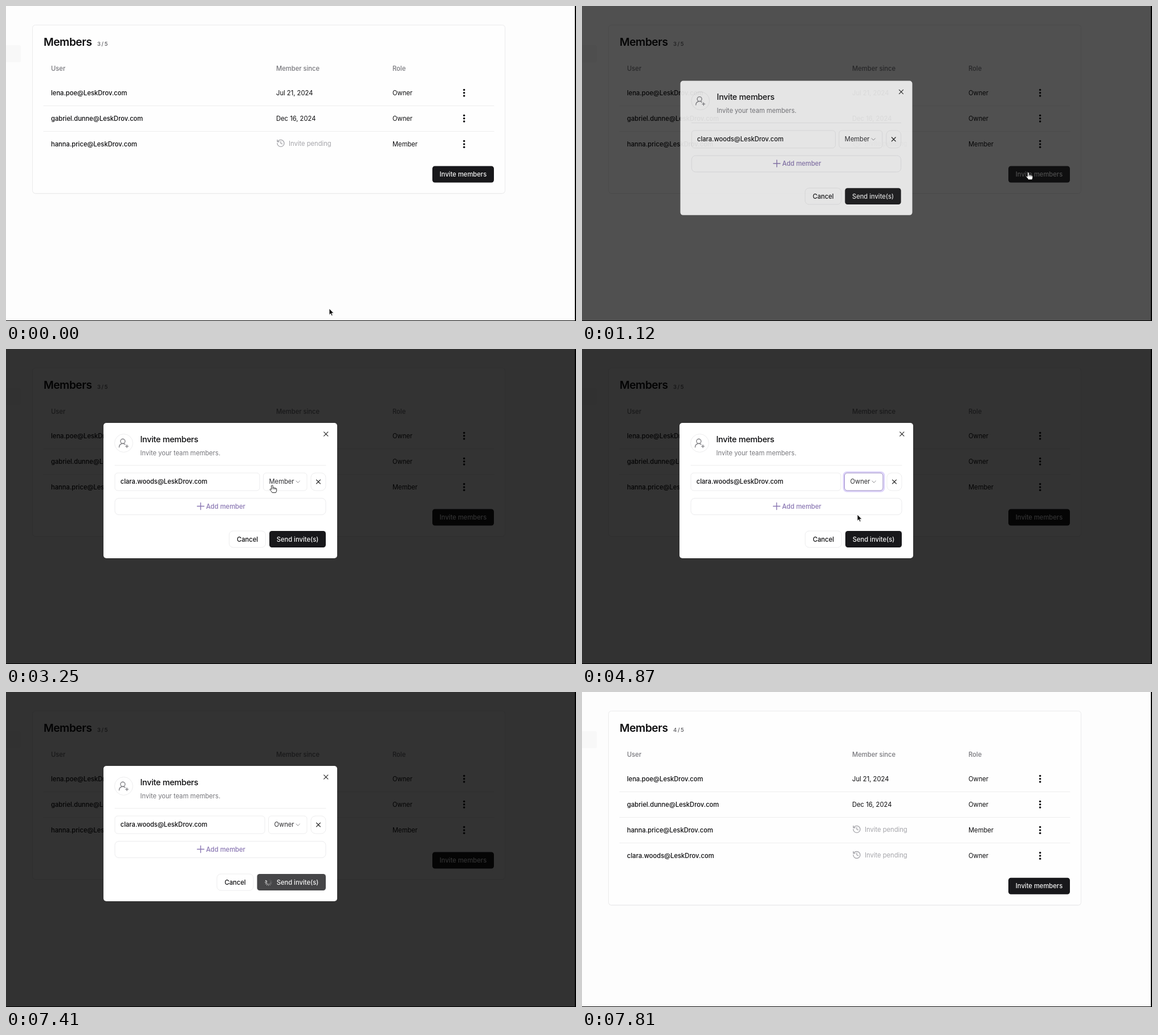
These frames come from a looping animation (1000x554 px, 9 s). An HTML page:

```html
<!DOCTYPE html>
<html lang="en">
<head>
<meta charset="utf-8">
<title>Invite members</title>
<style>
html, body { margin: 0; width: 100%; height: 100%; overflow: hidden; background: #fdfdfd; }
svg { display: block; width: 100vw; height: 100vh; font-family: Inter, sans-serif; cursor: none; }
</style>
</head>
<body>
<svg id="stage" viewBox="0 0 1000 554"></svg>
<script>
const LOOP = 9000, OPEN = 1005, PICK = 3590, CHOSEN = 4870, SEND = 6010, CLOSE = 7450, ADDED = 7810;
const INK = '#0c0c0e', GREY = '#77777c', PALE = '#a5a5aa', LINE = '#ededee', DARK = '#18181b', HOVER = '#2f2f32';
const stage = document.getElementById('stage');

const members = [
  ['lena.poe@LeskDrov.com', 'Jul 21, 2024', 'Owner'],
  ['gabriel.dunne@LeskDrov.com', 'Dec 16, 2024', 'Owner'],
  ['hanna.price@LeskDrov.com', '', 'Member'],
  ['clara.woods@LeskDrov.com', '', 'Owner']
];

// Cursor stops: time, x, y; it moves between stops of different place.
const stops = [
  [0, 567, 532], [110, 567, 532], [510, 783, 292], [1320, 783, 292], [2250, 402, 247],
  [2700, 402, 247], [3440, 468, 239], [3750, 468, 239], [4490, 483, 291], [4880, 483, 291], [5360, 512, 333], [LOOP, 512, 333]
];

const clamp = v => Math.min(1, Math.max(0, v));
const ramp = (t, a, b) => clamp((t - a) / (b - a));
const smooth = p => p * p * (3 - 2 * p);
const ease = p => 1 - (1 - p) ** 2.2;
const mix = (a, b, p) => a + (b - a) * p;
const within = (p, x1, y1, x2, y2) => p.x > x1 && p.x < x2 && p.y > y1 && p.y < y2;

const text = (x, y, s, fill = INK, weight = 400, size = 11.2, extra = '') =>
  `<text x="${x}" y="${y}" fill="${fill}" font-weight="${weight}" font-size="${size}" ${extra}>${s}</text>`;
const box = (x, y, x2, y2, r, fill, stroke = 'none', extra = '') =>
  `<rect x="${x}" y="${y}" width="${x2 - x}" height="${y2 - y}" rx="${r}" fill="${fill}" stroke="${stroke}" ${extra}/>`;
const path = (d, stroke, width, extra = '') =>
  `<path d="${d}" fill="none" stroke="${stroke}" stroke-width="${width}" stroke-linecap="round" stroke-linejoin="round" ${extra}/>`;
const icon = (x, y, k, d, stroke, width = 2) => path(d, stroke, width, `transform="translate(${x} ${y}) scale(${k})"`);
const cross = (x, y, r, width) => path(`M${x - r} ${y - r}l${2 * r} ${2 * r}m0 ${-2 * r}l${-2 * r} ${2 * r}`, '#222', width);
const rule = (x, x2, y) => path(`M${x} ${y}H${x2}`, LINE, 1);

function cursorAt(t) {
  const i = stops.findIndex(s => s[0] > t), [t1, x1, y1] = stops[i - 1], [t2, x2, y2] = stops[i];
  const p = 1 - (1 - ramp(t, t1, t2)) ** 3;
  return { x: mix(x1, x2, p), y: mix(y1, y2, p) };
}

function row([mail, since, role], i) {
  const c = 152.7 + i * 45.1;
  return (i ? rule(66, 856, Math.round(c - 23) + .5) : '') +
    text(79, c + 4, mail, INK, 500) +
    (since ? text(474, c + 4, since)
      : icon(474, c - 9.5, .667, 'M3 12a9 9 0 1 0 9-9 9.75 9.75 0 0 0-6.74 2.74L3 8M3 3v5h5M12 7v5l4 2', PALE) +
        text(496, c + 2.8, 'Invite pending', PALE)) +
    text(678, c + 4, role) +
    [-5.3, 0, 5.3].map(d => `<circle cx="803.7" cy="${c + d}" r="1.75" fill="${INK}"/>`).join('');
}

function page(t, hover) {
  const count = t >= ADDED ? 4 : 3, drop = (count - 3) * 45.2;
  return box(0, 0, 1000, 554, 0, '#fdfdfd') + box(-4, 69, 26, 99, 3, '#f8f8f8') +
    box(46.5, 34.5, 875.5, 330.5 + drop, 5, '#f2f2f2') +
    box(46.5, 33.5, 875.5, 329.5 + drop, 5, '#fefefe', '#ebebec') +
    text(66, 69.5, 'Members', INK, 600, 19.2, 'letter-spacing="-.48"') +
    text(160, 69.5, count + '/5', '#5c5c60', 500, 9.6, 'letter-spacing="1.6"') +
    text(79, 114.3, 'User', GREY, 500) + text(474, 114.3, 'Member since', GREY, 500) + text(678, 114.3, 'Role', GREY, 500) +
    members.slice(0, count).map(row).join('') +
    box(748, 281.5 + drop, 856, 310.5 + drop, 4.5, hover ? HOVER : DARK) +
    text(802, 300 + drop, 'Invite members', '#f5f5f5', 500, 11.2, 'text-anchor="middle"');
}

function spinner(t) {
  const head = Math.floor(t / 83);
  return Array.from({ length: 12 }, (_, i) => {
    const fade = ((i - head) % 12 + 12) % 12 / 11;
    return path('M0 3.2V6', '#fff', 1.1, `opacity="${fade ** 1.5}" transform="translate(460.5 334.5) rotate(${i * 30})"`);
  }).join('');
}

function dialog(t, cur) {
  const owner = t >= CHOSEN, busy = t >= SEND, focus = owner ? 1 - ramp(t, 5360, 5500) : 0;
  const left = owner ? 460.5 : 451.5, shift = busy ? -21.5 : 0;
  const warm = ramp(t, 1560, 1680) * (1 - ramp(t, 1960, 2100));
  const purple = `rgb(${mix(137, 124, warm)} ${mix(118, 77, warm)} ${mix(178, 190, warm)})`;
  const grey = mix(255, 249, warm);
  const sendFill = busy ? '#464648' : within(cur, 462, 320, 561, 349) ? HOVER : DARK;
  return box(171, 130, 581, 368, 5, '#fff') +
    `<circle cx="206.5" cy="165.5" r="16" fill="none" stroke="${LINE}"/>` +
    icon(196.9, 155.9, .8, 'M2 21a8 8 0 0 1 13.292-6M15 8a5 5 0 1 1-10 0a5 5 0 1 1 10 0M19 16v6M22 19h-6', '#808085', 1.7) +
    text(235.5, 164, 'Invite members', INK, 500, 14.4, 'letter-spacing="-.3"') +
    text(235.5, 187.3, 'Invite your team members.', GREY) +
    cross(561.3, 149.5, 3.6, 1.1) + rule(191, 561, 204.5) +
    box(191, 218, left - 6.5, 249, 5, '#fff', LINE) + text(200.7, 237.4, members[3][0], INK, 500) +
    (focus ? box(left - 1.5, 216.5, 530, 250.5, 6, 'none', '#ddd3fa', `stroke-width="2.5" opacity="${focus}"`) : '') +
    box(left, 218, 528, 249, 5, '#fff', LINE) +
    (focus ? box(left, 218, 528, 249, 5, 'none', '#9d8bcb', `opacity="${focus}"`) : '') +
    text(owner ? 470.5 : 461.5, 237.4, owner ? 'Owner' : 'Member', '#2b2b2e') +
    path('M509 232l3.2 3.2 3.2-3.2', '#8a8a8e', 1) +
    box(535, 218, 561, 249, 8, '#fff', LINE) + cross(548, 233.5, 3.4, 1.3) +
    box(191, 262.5, 561, 291.5, 7, `rgb(${grey} ${grey} ${grey})`, '#ebebed') +
    path('M335.5 276.5h12m-6-6v12', purple, 1.4) + text(351, 280.5, 'Add member', purple, 500) +
    box(391.5 + shift, 320, 455.5 + shift, 349, 7, '#fff', LINE) + text(405 + shift, 338.5, 'Cancel', INK, 500) +
    box(462 + shift, 320, 561, 349, 4.5, sendFill) + text(474.7, 338.5, 'Send invite(s)', '#f6f6f6', 500) +
    (busy ? spinner(t) : '');
}

function menu(t, cur) {
  const p = ramp(t, PICK, PICK + 120);
  const item = (y, s) => (within(cur, 452, y, 700, y + 26) ? box(455, y, 696, y + 26, 3, '#f4f4f5') : '') + text(465, y + 17, s, INK);
  return `<g opacity="${p}">${box(451.5, 253.5, 699.5, 313.5, 5, '#fff', '#e4e4e7')}${item(257, 'Member')}${item(284, 'Owner')}</g>`;
}

function pointer({ x, y }, hand) {
  const d = hand
    ? 'M-1.3 1.2Q0-.6 1.3 1.2V5Q2.6 4 3.7 5.2 5 4.5 6 5.8 7.6 5.5 7.8 7.2V10Q7.4 12 6.4 13.5H.2Q-1.2 11-3.5 8.8C-4.6 7.2-3 6.3-1.3 8ZM1.3 5V7.5M3.7 5.4V7.7M6 6V8'
    : 'M0 0V11.4L2.6 9 4.2 12.9 6.2 12 4.6 8.3H8Z';
  const [fill, stroke] = hand ? ['#fff', '#111'] : ['#111', '#fff'];
  return `<path transform="translate(${x} ${y})" d="${d}" fill="${fill}" stroke="${stroke}" stroke-width=".9" stroke-linejoin="round"/>`;
}

function render(t) {
  const cur = cursorAt(t);
  const shown = ease(ramp(t, OPEN, OPEN + 200)) * (1 - smooth(ramp(t, CLOSE, 7610)));
  const onInvite = t < 1390 && within(cur, 748, 281, 856, 311);
  const hand = onInvite || t > OPEN && (within(cur, 191, 262, 561, 290) ||
    within(cur, 451, 218, 528, 249) || within(cur, 462, 320, 561, 349));
  let out = page(t, onInvite);
  if (shown > 0) {
    out += box(0, 0, 998, 554, 0, '#000', 'none', `opacity="${.8 * shown}"`) +
      `<g opacity="${shown}" transform="translate(376 ${249 + 4.8 * (1 - shown)}) scale(${.95 + .05 * shown}) translate(-376 -249)">${dialog(t, cur)}</g>`;
  }
  if (t >= PICK && t < CHOSEN) out += menu(t, cur);
  out += box(998, 0, 1000, 554, 0, '#000') + box(0, 553, 1000, 554, 0, '#000');
  if (t < SEND) out += pointer(cur, hand);
  stage.innerHTML = out;
}

const start = performance.now();
function tick() {
  render((performance.now() - start) % LOOP);
  requestAnimationFrame(tick);
}
tick();
</script>
</body>
</html>
```
